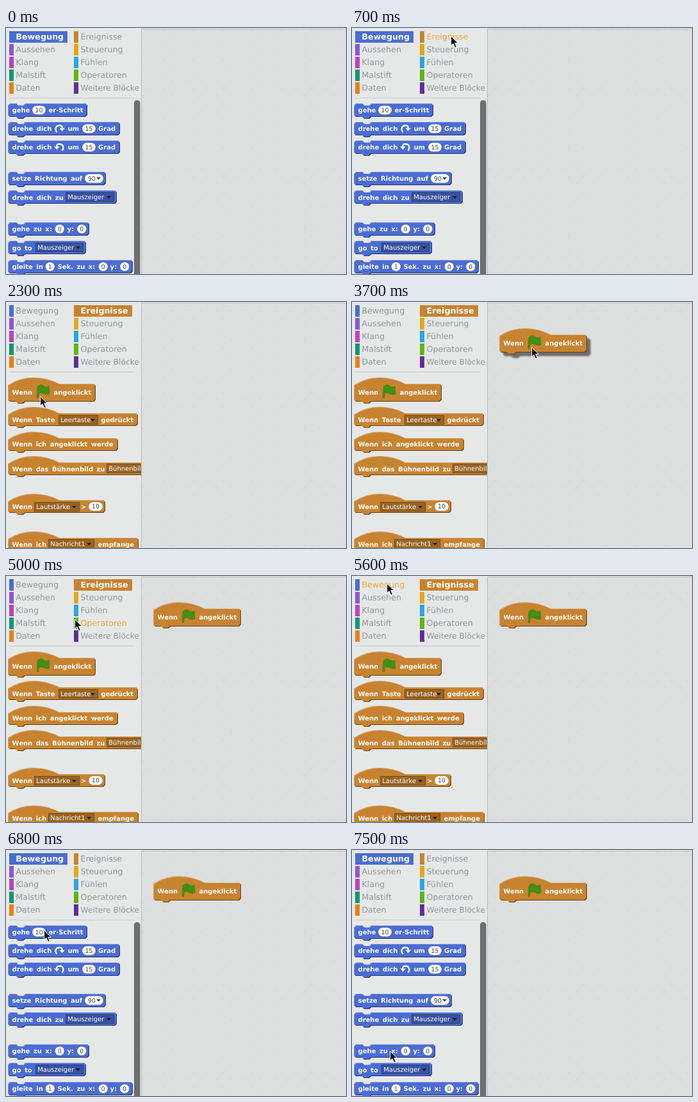
Recreate the animation shown at these times as an HTML page. Size 531 by 385 pixels, loop 8 s.

```html
<!DOCTYPE html>
<html lang="de">
<head>
<meta charset="utf-8">
<title>Blockpalette</title>
<style>
html, body { margin: 0; width: 100%; height: 100%; overflow: hidden; background: #e6e8e8; }
svg { display: block; font-family: "DejaVu Sans", Verdana, sans-serif; text-rendering: geometricPrecision; }
text { white-space: pre; }
.cat { font-size: 12.7px; fill: #939598; }
.cat.hover { fill: #f5a733; }
.cat.on { fill: #fff; font-weight: bold; }
.label { font-size: 10px; font-weight: bold; fill: #fff; word-spacing: 2px; }
.item { font-size: 10px; fill: #fff; }
.num { font-size: 9.4px; fill: #444; text-anchor: middle; }
</style>
</head>
<body>
<svg id="stage" width="531" height="385" viewBox="0 0 531 385">
  <defs>
    <filter id="bevel" x="-5%" y="-20%" width="110%" height="140%" color-interpolation-filters="sRGB">
      <feGaussianBlur in="SourceAlpha" stdDeviation=".6" result="soft"/>
      <feOffset in="soft" dx="-1" dy="-1" result="up"/>
      <feOffset in="soft" dx="1" dy="1" result="down"/>
      <feFlood flood-color="#000" flood-opacity=".5"/>
      <feComposite in2="up" operator="out"/>
      <feComposite in2="SourceAlpha" operator="in" result="shade"/>
      <feFlood flood-color="#fff" flood-opacity=".28"/>
      <feComposite in2="down" operator="out"/>
      <feComposite in2="SourceAlpha" operator="in" result="light"/>
      <feMerge><feMergeNode in="SourceGraphic"/><feMergeNode in="light"/><feMergeNode in="shade"/></feMerge>
    </filter>
    <filter id="blur"><feGaussianBlur stdDeviation=".8"/></filter>
    <pattern id="dots" x="212" y="2" width="23" height="23" patternUnits="userSpaceOnUse">
      <path d="M11 0h1v1h1v1h-1v1h-1v-1h-1v-1h1zM1 10h1v1h1v1h-1v1h-1v-1h-1v-1h1z" fill="#d6d7d7"/>
    </pattern>
    <clipPath id="pane"><rect y="110" width="211" height="275"/></clipPath>
  </defs>
  <rect width="531" height="385" fill="#e6e8e8"/>
  <rect x="211" y="1" width="320" height="384" fill="#dddede"/>
  <rect x="212" y="2" width="319" height="383" fill="url(#dots)"/>
  <path d="M211.5 385V1.5H531" fill="none" stroke="#b9bbbb"/>
  <path d="M5 109.5H200" stroke="#c6c8c9"/>
  <g id="cats"></g>
  <g clip-path="url(#pane)">
    <g id="motion"></g>
    <g id="events"></g>
  </g>
  <g id="dropped" transform="translate(227 -77)"></g>
  <path id="cursor" d="M.6 .8V15.6L4 12.6L6.7 18.8L9.4 17.6L6.7 11.6H11.4Z"
    fill="#10131f" stroke="#fff" stroke-width="1" stroke-linejoin="round"/>
</svg>
<script>
const BLUE = "#4a6cd4", BROWN = "#c88330";
const $ = id => document.getElementById(id);

// Categories: five rows in two columns
const cats = [
  ["Bewegung", BLUE], ["Aussehen", "#8a55d7"], ["Klang", "#bb42c3"], ["Malstift", "#0e9a6c"], ["Daten", "#ee7d16"],
  ["Ereignisse", BROWN], ["Steuerung", "#e1a91a"], ["Fühlen", "#2ca5e2"], ["Operatoren", "#5cb712"], ["Weitere Blöcke", "#632d99"]
];
$("cats").innerHTML = cats.map(([name, color], i) => {
  const x = i < 5 ? 5 : 106, y = 5 + i % 5 * 20;
  const size = name.length > 12 ? ' style="font-size:12.3px"' : "";
  return `<rect x="${x}" y="${y}" width="7" height="18" fill="${color}"/>` +
    `<text x="${i < 5 ? 15.3 : 116.5}" y="${y + 13}" class="cat"${size}>${name}</text>`;
}).join("");
const bars = [...$("cats").querySelectorAll("rect")];
const names = [...$("cats").querySelectorAll("text")];

// Block parts
const label = (x, y, s) => `<text class="label" x="${x}" y="${y}">${s}</text>`;
const arrow = (x, y, fill) => `<path d="M${x} ${y}h7l-3.5 4z" fill="${fill}"/>`;
const num = (x, cy, w, s) =>
  `<rect x="${x}" y="${cy - 7}" width="${w}" height="14" rx="7" fill="#fff" stroke="#0004" stroke-width=".6"/>` +
  `<text class="num" x="${x + (w > 25 ? 11 : w / 2)}" y="${cy + 3.4}">${s}</text>` +
  (w > 25 ? arrow(x + 18, cy - 2, "#444") : "");
const menu = (x, y, w, s) =>
  `<rect x="${x + .5}" y="${y + .5}" width="${w - 1}" height="14" fill="#0000003d" stroke="#0005"/>` +
  `<text class="item" x="${x + 3.2}" y="${y + 10.5}">${s}</text>` + arrow(x + w - 12, y + 6, "#1a1a1a");
const turn = (y, flip) =>
  `<g transform="translate(${flip ? 91 : 76} ${y}) scale(${flip ? -1 : 1} 1)">` +
  `<path d="M3.5 13C-1 7 3 2.5 7.500 2.500C10.500 2.500 12 4.500 12 7" fill="none" stroke="#fff" stroke-width="2.3"/>` +
  `<path d="M7.500 6.500H16L11.500 11.500Z" fill="#fff"/></g>`;
const flag = `<path d="M49 133C52 129 56 129 59 131.500S65 133 67 131.500L68 144C64 146 61 144.500 58 143S53 142 51 144L50.500 150H48.500Z"
  fill="#439014" stroke="#2f7a10" stroke-width=".6"/>`;

const base = (w, h) =>
  `H${w - 3}l3 3V${h - 3}l-3 3H27l-3 3H16l-3-3H3l-3-3Z`;
const shape = (d, y, fill) => `<path transform="translate(3 ${y})" d="${d}" fill="${fill}" filter="url(#bevel)"/>`;
const stack = (y, w) => shape("M0 3L3 0H13l3 3h8l3-3" + base(w, 21), y, BLUE);
const hatPath = (w, h) => "M0 12Q18.200 0 40 0Q61.200 .2 80 10" + base(w, h).replace("l3 3V", "l3 3V");
const hat = (y, w, h = 30) => shape(hatPath(w, h), y, BROWN);

$("motion").innerHTML =
  `<rect x="200" y="113" width="9.500" height="290" rx="4.500" fill="#6c6e70"/>` +
  stack(118, 124) + label(9.5, 132, "gehe") + num(41, 128.5, 21, 10) + label(66.5, 132, "er-Schritt") +
  [147, 176].map((y, i) =>
    stack(y, 175) + label(9.5, y + 14, "drehe dich") + turn(y + 3, i) + label(96.5, y + 14, "um") +
    num(119, y + 10.5, 21, 15) + label(144, y + 14, "Grad")).join("") +
  stack(225, 153) + label(9.5, 239, "setze Richtung auf") + num(123, 235.5, 29, 90) +
  stack(254, 170) + label(9.5, 269, "drehe dich zu") + menu(93, 257, 76, "Mauszeiger") +
  stack(304, 127) + label(9.5, 318, "gehe zu x:") + num(76.5, 314.5, 14.5, 0) + label(95.5, 318, "y:") + num(111, 314.5, 14.5, 0) +
  stack(333, 122) + label(9.5, 348, "go to") + menu(46, 336, 75, "Mauszeiger") +
  stack(363, 195) + label(9.5, 377, "gleite in") + num(61.5, 373.5, 14.5, 1) + label(80.5, 377, "Sek. zu x:") +
  num(144.5, 373.5, 14.5, 0) + label(162.5, 377, "y:") + num(178, 373.5, 14.5, 0);

const flagBlock = hat(118, 137, 38) + label(9.5, 145, "Wenn") + flag + label(74.5, 145, "angeklickt");
$("events").innerHTML = flagBlock +
  hat(164, 203) + label(9.5, 188, "Wenn Taste") + menu(82, 177, 62, "Leertaste") + label(148.5, 188, "gedrückt") +
  hat(203, 172) + label(9.5, 226, "Wenn ich angeklickt werde") +
  hat(241, 260) + label(9.5, 265, "Wenn das Bühnenbild zu") + menu(157, 253, 80, "Bühnenbild1") +
  hat(300, 152) + label(9.5, 324, "Wenn") + menu(44, 313, 71, "Lautstärke") + label(117, 324, "&gt;") + num(129, 320, 22, 10) +
  hat(359, 204) + label(9.5, 383, "Wenn ich") + menu(66, 371, 72, "Nachricht1") + label(143.5, 383, "empfange");
$("dropped").innerHTML =
  `<path id="shadow" transform="translate(8.700 123.700)" d="${hatPath(137, 38)}" fill="#333" opacity=".65" filter="url(#blur)"/>` + flagBlock;

// Pointer moves: start, steps of 100 ms, x, y
const moves = [
  [200, 6, 154, 12], [1600, 1, 151, 16], [1700, 1, 133, 46], [1800, 1, 104, 72], [1900, 5, 53, 147],
  [3700, 1, 280, 70], [4500, 2, 189, 97], [4800, 1, 130, 84], [5000, 1, 107, 67], [5100, 1, 75, 41],
  [5300, 2, 50, 12], [5600, 1, 54, 11], [6200, 1, 54, 15], [6400, 1, 57, 35], [6600, 1, 58, 66],
  [6800, 1, 59, 125], [7000, 1, 67, 177], [7200, 2, 60, 306], [7500, 1, 59, 314]
];

function pointer(t) {
  let x = 157, y = -18;
  for (const [start, steps, toX, toY] of moves) {
    if (t < start) break;
    const u = Math.min(1, (Math.floor((t - start) / 100) + 1) / steps);
    const p = steps > 2 ? 1 - (1 - u) ** 2 : u;
    x = Math.round(x + (toX - x) * p);
    y = Math.round(y + (toY - y) * p);
  }
  return [x, y];
}

function hovered(x, y) {
  const row = Math.floor((y - 1) / 20);
  const inside = x < 211 && row >= 0 && row < 5 && y - 1 - row * 20 < 15;
  return inside ? row + (x < 106 ? 0 : 5) : -1;
}

const show = (el, on) => el.setAttribute("visibility", on ? "inherit" : "hidden");

function draw(t) {
  const [x, y] = pointer(t);
  const events = t >= 1300 && t < 5900;
  const selected = events ? 5 : 0, hover = hovered(x, y);
  $("cursor").setAttribute("transform", `translate(${x} ${y})`);
  show($("motion"), !events);
  show($("events"), events);
  $("dropped").setAttribute("visibility", t >= 3700 ? "visible" : "hidden");
  show($("shadow"), t < 4000);
  cats.forEach((_, i) => {
    bars[i].setAttribute("width", i === selected ? 91 : 7);
    names[i].setAttribute("class", "cat" + (i === selected ? " on" : i === hover ? " hover" : ""));
  });
}

const begin = performance.now();
function loop() {
  draw((performance.now() - begin) % 8000);
  requestAnimationFrame(loop);
}
draw(0);
requestAnimationFrame(loop);
</script>
</body>
</html>
```
